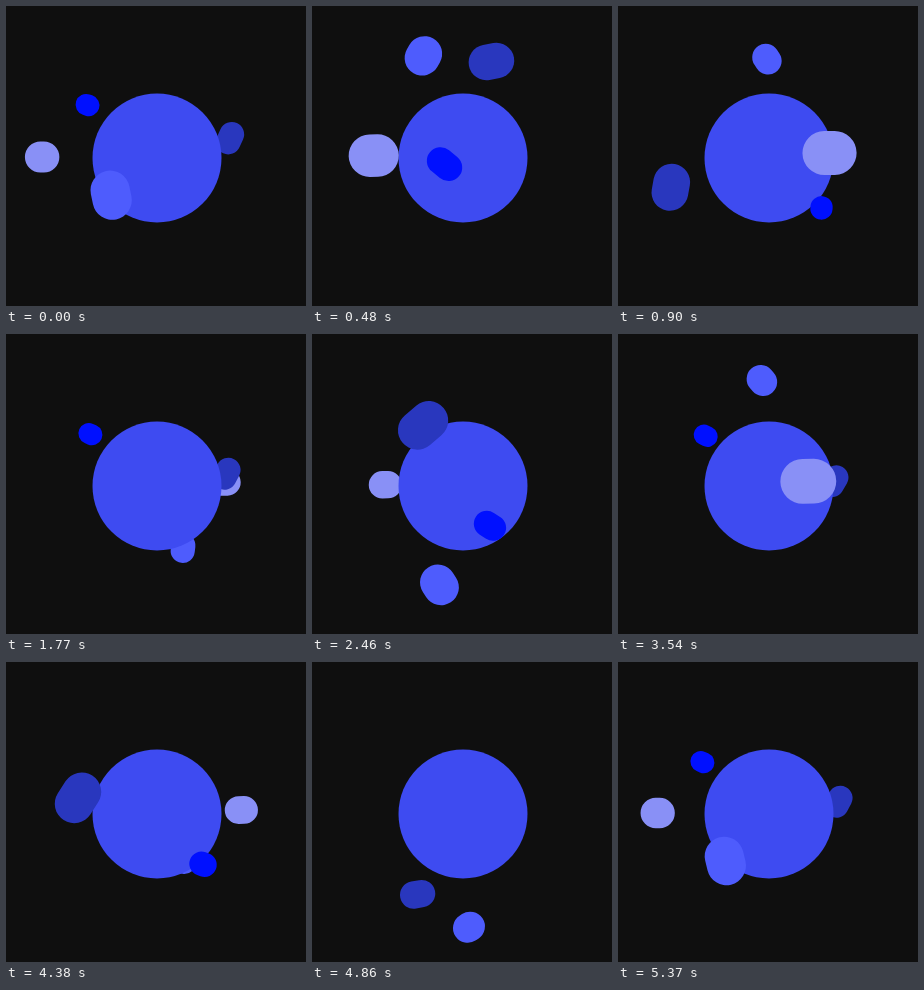
Recreate the animation shown at these times as an HTML page with a canvas. Size 300 by 300 pixels, loop 5400 ms.

```html
<!DOCTYPE html>
<html lang="en">
<head>
<meta charset="utf-8">
<title>Orbits</title>
<style>
  html, body { margin: 0; width: 100%; height: 100%; overflow: hidden; background: #0f0f0f; }
  canvas { display: block; width: 300px; height: 300px; }
</style>
</head>
<body>
<canvas id="stage" width="300" height="300"></canvas>
<script>
const ctx = document.getElementById('stage').getContext('2d');
const LOOP = 5400, STEP = 30;
const globe = { x: 151, y: 152, r: 64.5, color: '#3e4bf1' };

// front: offset at the nearest point; side: offset a quarter turn later.
// depth: strength of the perspective; near: time of the nearest point.
const moons = [
  { color: '#8990f6', r: 16.2, period: 2700, near: 738, depth: 0.285,
    center: [151, 149], front: [0, -0.8], side: [121, -2] },
  { color: '#2937be', r: 14.8, period: 1800, near: 715, depth: 0.243,
    center: [155, 152], front: [-48.3, -31.4], side: [-73, 81] },
  { color: '#4e5cfd', r: 14.5, period: 2700, near: 106, depth: 0.27,
    center: [149, 152.5], front: [-36, 0], side: [-10.3, -111] },
  { color: '#0010ff', r: 10.9, period: 1800, near: 480, depth: 0.2,
    center: [141.25, 149.4], front: [-7, 7], side: [62.1, 51] }
];

function locate(moon, t) {
  const a = (t - moon.near) / moon.period * 2 * Math.PI;
  const c = Math.cos(a), s = Math.sin(a);
  const z = moon.depth * c;
  const scale = 1 / (1 - z);
  const [x, y] = moon.center.map((o, i) => o + scale * (moon.front[i] * c + moon.side[i] * s));
  return { x, y, z, r: moon.r * scale };
}

// A moon is smeared along the path it covers in one step.
function drawMoon({ moon, t, r }) {
  const from = locate(moon, t - STEP / 2), to = locate(moon, t + STEP / 2);
  ctx.strokeStyle = moon.color;
  ctx.lineWidth = 2 * r;
  ctx.lineCap = 'round';
  ctx.beginPath();
  ctx.moveTo(from.x, from.y);
  ctx.lineTo(to.x, to.y);
  ctx.stroke();
}

function drawGlobe() {
  ctx.fillStyle = globe.color;
  ctx.beginPath();
  ctx.arc(globe.x, globe.y, globe.r, 0, 2 * Math.PI);
  ctx.fill();
}

function draw(t) {
  ctx.fillStyle = '#0f0f0f';
  ctx.fillRect(0, 0, 300, 300);
  const sorted = moons
    .map(moon => ({ moon, t, ...locate(moon, t) }))
    .sort((a, b) => a.z - b.z);
  sorted.filter(m => m.z < 0).forEach(drawMoon);
  drawGlobe();
  sorted.filter(m => m.z >= 0).forEach(drawMoon);
}

const start = performance.now();
function tick() {
  const t = (performance.now() - start) % LOOP;
  draw(Math.floor(t / STEP) * STEP);
  requestAnimationFrame(tick);
}
tick();
</script>
</body>
</html>
```
